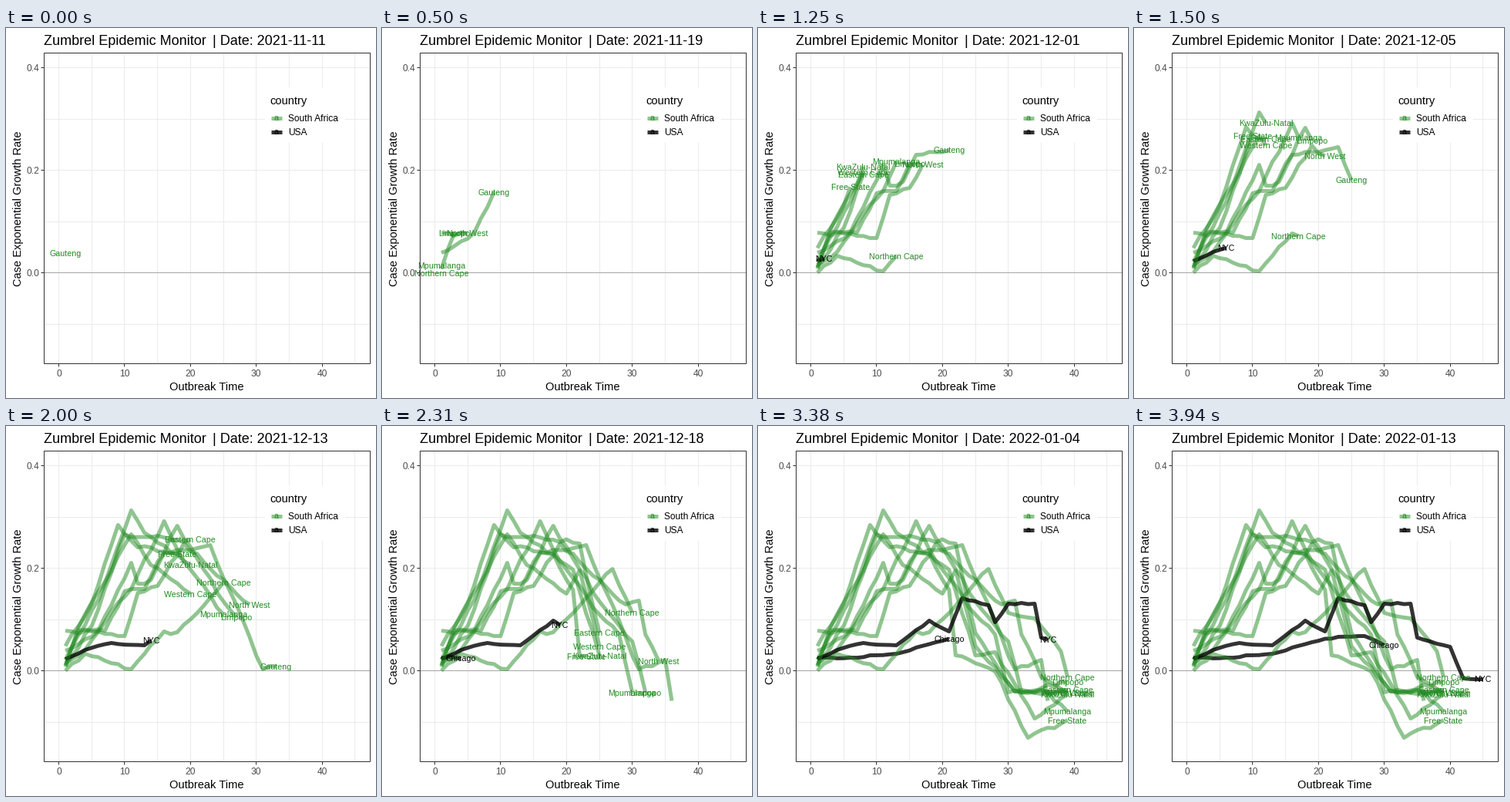
A matplotlib script that plays this animation: 480 by 480 pixels, repeating every 4000 ms.

```python
import matplotlib.pyplot as plt
import numpy as np
from matplotlib.animation import FuncAnimation
from matplotlib.patches import Rectangle

plt.rcParams["font.family"] = "Liberation Sans"

SIZE = 480
LOOP_MS, FRAMES, DAYS = 4000, 160, 64
LEFT, RIGHT, TOP, BOTTOM = 49, 472, 32, 435
ZERO_X, DAY_W = 68.5, 8.54
ZERO_Y, RATE_H = 317.5, 665
GREEN, BLACK = "#228b22", "#000000"
GRID, FRAME, TICK = "#ebebeb", "#333333", "#4d4d4d"

rng = np.random.default_rng(11)

# At 72 dpi, points and pixels are the same.
fig = plt.figure(figsize=(SIZE / 72, SIZE / 72), dpi=72, facecolor="white")
ax = fig.add_axes([0, 0, 1, 1])
ax.set_xlim(0, SIZE)
ax.set_ylim(SIZE, 0)
ax.axis("off")


def day_x(day):
    return ZERO_X + DAY_W * day


def rate_y(rate):
    return ZERO_Y - RATE_H * rate


def line(xs, ys, color, width=1, z=1, alpha=1):
    return ax.plot(xs, ys, color=color, lw=width, alpha=alpha, zorder=z,
                   solid_capstyle="butt", solid_joinstyle="round")[0]


def across(y, x0, x1, color, z=1):
    # The small shift makes a thin line snap to the pixel it lies in.
    line([x0, x1], [y - 0.4] * 2, color, z=z)


def down(x, y0, y1, color):
    line([x - 0.4] * 2, [y0, y1], color)


def text(x, y, s, size, color=BLACK, ha="left", z=20, **kw):
    return ax.text(x, y, s, fontsize=size, color=color, ha=ha,
                   va="baseline", zorder=z, **kw)


def draw_panel():
    for day in range(0, 46, 5):
        down(day_x(day), TOP, BOTTOM, GRID)
    for tenth in range(-1, 5):
        across(rate_y(tenth / 10), LEFT, RIGHT, GRID)
    across(ZERO_Y, LEFT, RIGHT, "#a6a6a6", z=2)
    ax.add_patch(Rectangle((LEFT, TOP), RIGHT - LEFT, BOTTOM - TOP,
                           fill=False, ec=FRAME, lw=1, zorder=15))
    for day in range(0, 41, 10):
        down(day_x(day), BOTTOM, BOTTOM + 4, FRAME)
        text(day_x(day), 452, str(day), 12, TICK, "center")
    for rate in (0, 0.2, 0.4):
        across(rate_y(rate), LEFT - 4, LEFT, FRAME)
        text(43, rate_y(rate) + 4.5, f"{rate:.1f}", 12, TICK, "right")
    text(260.5, 470, "Outbreak Time", 14.67, ha="center")
    text(20, 234, "Case Exponential Growth Rate", 14.67, ha="center",
         rotation=90, rotation_mode="anchor")
    text(49, 22, "Zumbrel Epidemic Monitor", 18)


def draw_legend():
    ax.add_patch(Rectangle((336, 77), 104, 72, fc="white", ec="none", zorder=16))
    text(342.5, 99, "country", 14.67)
    rows = (("South Africa", GREEN, 0.5, 116.5), ("USA", BLACK, 0.8, 134.5))
    for name, color, alpha, y in rows:
        line([344, 358], [y, y], color, 5, 17, alpha)
        text(351, y + 4, "a", 10.67, color, "center")
        text(366.5, y + 4.5, name, 12)


class Trace:
    """A growing path through (day, pixels above zero) turning points."""

    def __init__(self, name, start, *points, color=GREEN, alpha=0.5,
                 wobble=3, stays=True):
        self.start, self.stays = start, stays
        knots, heights = np.array(points).T
        days = np.arange(1, knots[-1] + 1)
        noise = rng.uniform(-wobble, wobble, len(days))
        noise[knots - 1] = 0
        self.xs = day_x(days)
        self.ys = ZERO_Y - np.interp(days, knots, heights) - noise
        self.path = line([], [], color, 5, 5, alpha)
        self.label = text(0, 0, name, 10.67, color, "center", z=10)

    def show(self, today):
        age = today - self.start + 1
        n = max(0, min(age, len(self.xs)))
        self.path.set_data(self.xs[:n], self.ys[:n])
        self.label.set_visible(n > 0 and (self.stays or age == n))
        if n:
            self.label.set_position((self.xs[n - 1], self.ys[n - 1] + 4))


draw_panel()
draw_legend()
date = text(268, 22, "", 18)

usa = dict(color=BLACK, alpha=0.8, wobble=1)
traces = [
    Trace("Chicago", 34, (1, 17), (6, 17), (13, 22), (19, 37), (23, 44),
          (27, 45), (30, 33), **usa),
    Trace("Eastern Cape", 13, (1, 7), (5, 58), (10, 177), (18, 170),
          (22, 165), (25, 49), (31, -27), (39, -25)),
    Trace("Free State", 15, (1, 32), (5, 87), (9, 189), (12, 160), (18, 152),
          (21, 105), (22, 20), (28, -1), (33, -87), (39, -64)),
    Trace("Gauteng", 0, (1, 26), (6, 52), (11, 140), (12, 113), (14, 118),
          (16, 153), (23, 163), (31, 2), (35, 14), (36, -39), stays=False),
    Trace("KwaZulu-Natal", 13, (1, 14), (6, 92), (11, 208), (13, 179),
          (21, 131), (25, 20), (28, 24), (34, -62), (39, -31)),
    Trace("Limpopo", 6, (1, 5), (3, 52), (7, 52), (10, 103), (13, 106),
          (18, 188), (25, 90), (30, 38), (32, -28), (39, -15)),
    Trace("Mpumalanga", 8, (1, 10), (4, 27), (8, 77), (11, 106), (16, 194),
          (18, 157), (25, 73), (28, 47), (30, -28), (36, -28), (39, -53)),
    Trace("North West", 4, (1, 52), (10, 45), (12, 101), (15, 110), (19, 165),
          (29, 86), (31, 91), (32, 47), (35, -8), (39, -28)),
    Trace("Northern Cape", 8, (1, 0), (4, 22), (11, 2), (16, 51), (18, 50),
          (27, 132), (30, 75), (34, 68), (38, 25), (39, -8)),
    Trace("NYC", 19, (1, 15), (4, 27), (8, 36), (13, 33), (18, 65), (21, 51),
          (23, 94), (27, 85), (28, 63), (30, 87), (34, 87), (35, 43),
          (40, 31), (42, -10), (45, -11), **usa),
    Trace("Western Cape", 13, (1, 7), (3, 57), (11, 177), (14, 137),
          (20, 100), (22, 130), (25, 32), (31, -27), (39, -28)),
]


def update(frame):
    # The day in force at the middle of this frame.
    today = (2 * frame + 1) * DAYS // (2 * FRAMES)
    date.set_text(f"| Date: {np.datetime64('2021-11-11') + today}")
    for trace in traces:
        trace.show(today)
    return []


anim = FuncAnimation(fig, update, frames=FRAMES, interval=LOOP_MS / FRAMES,
                     init_func=lambda: update(0), repeat=True, repeat_delay=0)
plt.show()
```
